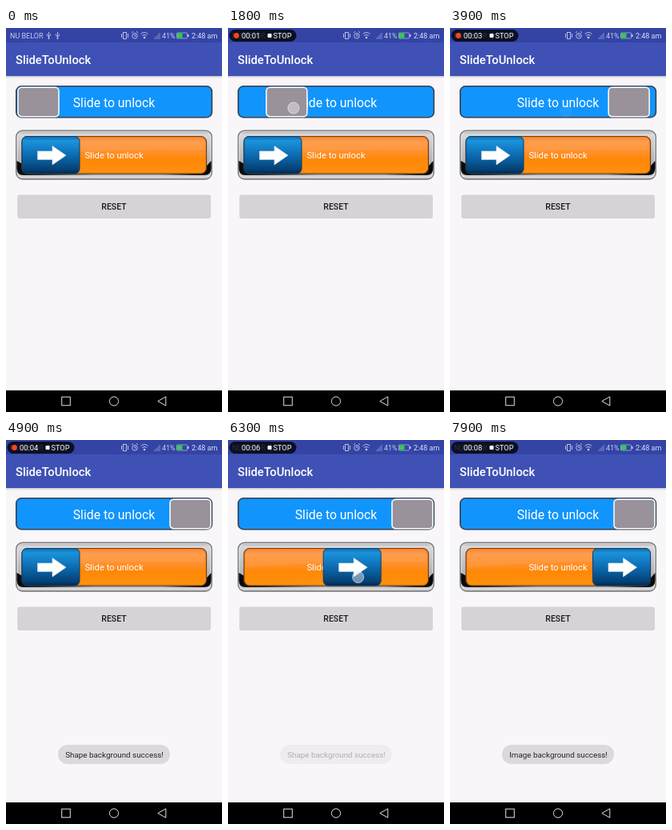
These frames come from a looping animation (270x480 px, 8000 ms). An HTML page:

```html
<!DOCTYPE html>
<html lang="en">
<head>
<meta charset="utf-8">
<title>Slide to unlock</title>
<style>
  html, body { margin: 0; width: 100%; height: 100%; overflow: hidden; background: #f8f6f9; }
  svg { display: block; width: 270px; height: 480px; font-family: Roboto, sans-serif; }
  .mid { text-anchor: middle; }
  .bold { font-weight: 500; }
  .line { fill: none; stroke: #e0e0e0; }
  .icon { fill: none; stroke: #c5cbe8; stroke-width: .9; }
</style>
</head>
<body>
<svg viewBox="0 0 270 480">
  <defs>
    <linearGradient id="shade" x2="0" y2="1">
      <stop stop-color="#777" stop-opacity=".35"/><stop offset="1" stop-color="#777" stop-opacity="0"/>
    </linearGradient>
    <linearGradient id="metal" x2="0" y2="1">
      <stop stop-color="#a0a0a4"/><stop offset=".08" stop-color="#d9d9dc"/>
      <stop offset=".5" stop-color="#bcbcc0"/><stop offset=".85" stop-color="#a9a9ac"/>
      <stop offset=".95" stop-color="#dcdcde"/><stop offset="1" stop-color="#88888b"/>
    </linearGradient>
    <linearGradient id="dark">
      <stop stop-color="#080808"/><stop offset=".12" stop-color="#222"/>
      <stop offset=".4" stop-color="#98989a"/><stop offset=".75" stop-color="#98989a"/>
      <stop offset=".92" stop-color="#161616"/><stop offset="1" stop-color="#050505"/>
    </linearGradient>
    <linearGradient id="orange" x2="0" y2="1">
      <stop stop-color="#f97a1c"/><stop offset=".15" stop-color="#ff9642"/>
      <stop offset=".5" stop-color="#ff8d22"/><stop offset=".6" stop-color="#ff8806"/>
      <stop offset="1" stop-color="#ff9010"/>
    </linearGradient>
    <linearGradient id="blue" x2="0" y2="1">
      <stop stop-color="#0f6cab"/><stop offset=".12" stop-color="#1b93dc"/>
      <stop offset=".5" stop-color="#0c6cb2"/><stop offset=".9" stop-color="#053f72"/>
      <stop offset="1" stop-color="#04264a"/>
    </linearGradient>
  </defs>

  <rect width="270" height="480" fill="#f8f6f9"/>
  <rect y="60" width="270" height="3" fill="url(#shade)"/>
  <rect width="270" height="60" fill="#3f51b5"/>
  <rect width="270" height="18" fill="#3444a5"/>
  <text class="bold" x="12" y="45" font-size="14.8" fill="#fff">SlideToUnlock</text>

  <!-- status bar -->
  <g font-size="9" fill="#c5cbe8">
    <text x="5" y="12.5">NU BELOR</text>
    <g id="usb">
      <path class="icon" d="M53.5 5v8M51.5 7.5v2l2 1.5l2-1.5v-2"/>
      <circle cx="53.5" cy="13" r="1"/>
    </g>
    <use href="#usb" x="11"/>
    <rect class="icon" x="146.5" y="5.5" width="4" height="8"/>
    <path class="icon" d="M144.500 7v5M152.500 7v5"/>
    <circle class="icon" cx="161" cy="9.800" r="3.300"/>
    <path class="icon" d="M161 7.500v2.500h2M157 6l2-1.800M165 6l-2-1.800"/>
    <path class="icon" d="M168.500 7.500q4.500-4 9 0M170.200 9.600q2.800-2.400 5.600 0"/>
    <circle cx="173" cy="12" r="1.300"/>
    <path class="icon" d="M186 14v-2M188 14v-4M190 14V8M192 14V6" opacity=".6"/>
    <text x="195" y="12.500">41%</text>
    <rect class="icon" x="213.500" y="6" width="13" height="7" rx="1" opacity=".7"/>
    <rect x="214" y="6.500" width="6.500" height="6" fill="#30cc50"/>
    <rect x="227" y="8" width="1.500" height="3"/>
    <text x="232" y="12.500" fill="#dde0f2">2:48 am</text>
  </g>
  <g id="pill">
    <rect x="1.500" y="2" width="84" height="15" rx="7.500" fill="#000" fill-opacity=".78"/>
    <circle id="dot" cx="10.500" cy="9.500" r="3.400" fill="#f5451c"/>
    <g font-size="9.400" fill="#fff">
      <text id="clock" x="17" y="12.800"></text>
      <rect x="49.500" y="7" width="5" height="5" rx="1"/>
      <text x="56.500" y="12.800" font-size="9.200">STOP</text>
    </g>
  </g>

  <!-- shape slider -->
  <rect x="12.800" y="72.800" width="244.600" height="38.900" rx="6.500" fill="#1195fc" stroke="#3a3f50" stroke-width="1.600"/>
  <text class="mid" x="135" y="98.600" font-size="15.750" fill="#fff">Slide to unlock</text>
  <rect id="knobA" x="1" y="74.200" width="51" height="36.500" rx="4.500" fill="#99929a" stroke="#fff" stroke-width="1.500"/>

  <!-- image slider -->
  <rect x="12.700" y="128.200" width="244.600" height="60.800" rx="8" fill="url(#metal)" stroke="#77777b" stroke-width="1.300"/>
  <rect x="14.200" y="129.700" width="241.600" height="57.800" rx="7" fill="none" stroke="#eee" stroke-opacity=".7"/>
  <path d="M13.500 166l7 4v6q0 6 8 6h211q8 0 9-7l8-9v9q0 9-9 9H22q-8.500 0-8.500-9z" fill="url(#dark)"/>
  <rect x="20" y="135.500" width="230.500" height="46.500" rx="7" fill="url(#orange)" stroke="#753b0b" stroke-width="1.200"/>
  <path d="M22 140q0-3.500 5-3.500h216q5 0 5 3.500v13q-110-3-226 6z" fill="#fff" opacity=".07"/>
  <text class="mid" x="135" y="163.200" font-size="11.250" fill="#fff">Slide to unlock</text>
  <g id="knobB">
    <rect x=".5" y="135.500" width="72" height="46.500" rx="6" fill="url(#blue)" stroke="#0a3c66"/>
    <path d="M20 154h18.500v-6.500l17 11.700l-17 11.700v-6.500H20z" fill="#fff" stroke="#cfdde8" stroke-width=".7" stroke-linejoin="round"/>
  </g>

  <!-- button -->
  <rect x="14.500" y="209" width="241.300" height="29" rx="2" fill="#aaa" opacity=".5"/>
  <rect x="14.500" y="208.500" width="241.300" height="28.500" rx="2" fill="#d6d3d7"/>
  <text class="mid bold" x="135" y="226.800" font-size="10.500" fill="#1b1b1b">RESET</text>

  <g id="toast">
    <rect x="65" y="381" width="140" height="24" rx="12" fill="#dcd9dd"/>
    <text id="note" class="mid" x="135.500" y="396.700" font-size="9.850" fill="#252525"></text>
  </g>

  <g id="finger">
    <circle r="7.500" fill="#e6e6ea" fill-opacity=".5"/>
    <circle r="7" fill="none" stroke="#fff" stroke-opacity=".4"/>
  </g>

  <!-- navigation bar -->
  <rect y="453" width="270" height="27" fill="#000"/>
  <rect class="line" x="69.700" y="461.200" width="10.600" height="10.600"/>
  <circle class="line" cx="135" cy="466.500" r="5.600"/>
  <path class="line" d="M189.800 466.500l10-5.600v11.200z" stroke-linejoin="round"/>
</svg>
<script>
const LOOP = 8000, STEP = 100, SECOND = 980, SETTLE = 280;
const $ = id => document.getElementById(id);

const sliders = { knobA: { home: 14, end: 204 }, knobB: { home: 19.5, end: 178 } };

// Each drag: when the finger is down, where it starts, how far it goes
const drags = [
  { knob: "knobA", down: 1100, up: 2100, x: 49, y: 100, dx: 47, dy: 0, unlocks: false },
  { knob: "knobA", down: 2600, up: 3700, x: 39, y: 101, dx: 106, dy: 3, unlocks: true },
  { knob: "knobB", down: 5140, up: 7000, x: 63.5, y: 164, dx: 159, dy: 12, unlocks: true }
];

const ramp = (t, from, to) => Math.min(1, Math.max(0, (t - from) / (to - from)));
const easeOut = p => 1 - (1 - p) ** 2;
const progress = (d, t) => ramp(t, d.down, d.up);
const move = (id, x, y = 0) => $(id).setAttribute("transform", `translate(${x} ${y})`);
const fade = (id, value) => $(id).setAttribute("opacity", value);

// The knob follows the finger, then settles at the end or back home
function knobX(id, t) {
  const { home, end } = sliders[id];
  const drag = drags.findLast(d => d.knob === id && d.down <= t);
  if (!drag) return home;
  const held = Math.min(end, home + drag.dx * progress(drag, t));
  const rest = drag.unlocks ? end : home;
  return held + (rest - held) * easeOut(ramp(t, drag.up, drag.up + SETTLE));
}

function drawFinger(t) {
  const drag = drags.find(d => t < d.up + 230);
  if (!drag) return fade("finger", 0);
  const p = progress(drag, t);
  move("finger", drag.x + drag.dx * p, drag.y + drag.dy * p);
  fade("finger", ramp(t, drag.down - 200, drag.down) - ramp(t, drag.up, drag.up + 230));
}

function draw(t) {
  fade("pill", ramp(t, 0, 300));
  fade("dot", Math.floor(t / SECOND) % 2);
  $("clock").textContent = "00:0" + Math.floor(Math.max(0, t - 50) / SECOND);
  for (const id in sliders) move(id, knobX(id, t));
  drawFinger(t);
  fade("toast", ramp(t, 4000, 4300) - ramp(t, 6100, 6400) + ramp(t, 7100, 7400));
  $("note").textContent = (t < 6600 ? "Shape" : "Image") + " background success!";
}

const start = performance.now();
function frame() {
  const t = (performance.now() - start) % LOOP;
  draw(Math.floor(t / STEP) * STEP);
  requestAnimationFrame(frame);
}
frame();
</script>
</body>
</html>
```
